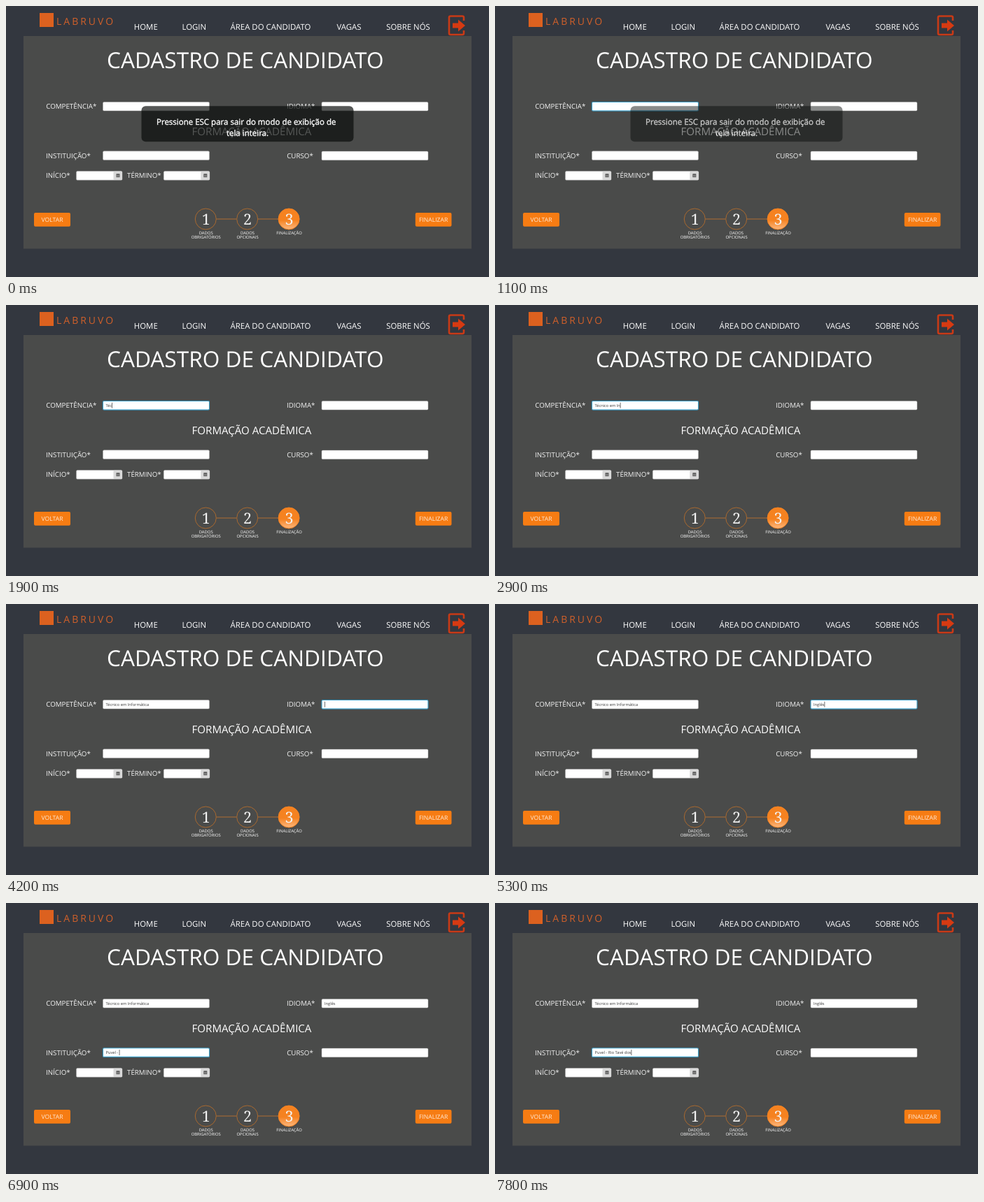
An HTML page that plays this animation: 690 px wide and 388 px high, repeating every 8000 ms.

```html
<!DOCTYPE html>
<html lang="pt">
<head>
<meta charset="utf-8">
<title>Cadastro</title>
<style>
html, body { margin: 0; width: 100%; height: 100%; overflow: hidden; background: #33373f; }
svg { display: block; width: 100vw; height: 100vh; font-family: "Open Sans", "Noto Sans", sans-serif; text-rendering: geometricPrecision; }
</style>
</head>
<body>
<svg id="stage" viewBox="0 0 690 388" preserveAspectRatio="none">
  <defs>
    <linearGradient id="glow" x1="0" y1="0" x2="0" y2="1">
      <stop offset=".55" stop-color="#f58220"/>
      <stop offset="1" stop-color="#fdb880"/>
    </linearGradient>
  </defs>
</svg>
<script>
const LOOP = 8000;
const stage = document.getElementById('stage');

function add(tag, attrs, parent = stage) {
  const el = document.createElementNS('http://www.w3.org/2000/svg', tag);
  for (const key in attrs) el.setAttribute(key, attrs[key]);
  return parent.appendChild(el);
}

function label(text, x, y, size, attrs = {}, parent = stage) {
  const el = add('text', { x, y, 'font-size': size, fill: '#fff', ...attrs }, parent);
  el.textContent = text;
  return el;
}

const centred = (text, x, y, size, attrs, parent) =>
  label(text, x, y, size, { 'text-anchor': 'middle', ...attrs }, parent);

const box = (x, y, width, height, rx, fill, attrs, parent) =>
  add('rect', { x, y, width, height, rx, fill, ...attrs }, parent);

// Header
box(48, 10, 20, 20, 0, '#dc611f');
label('LABRUVO', 72, 26.5, 14, { fill: '#d0602a', 'letter-spacing': 3 });
[['HOME', 199.8], ['LOGIN', 268.8], ['ÁREA DO CANDIDATO', 378], ['VAGAS', 490], ['SOBRE NÓS', 574.5]]
  .forEach(([text, x]) => centred(text, x, 34, 11.4));
add('path', { d: 'M654 21V16.5Q654 14.5 652 14.5H635Q633 14.5 633 16.5V39Q633 41 635 41H652Q654 41 654 39V35',
  fill: 'none', stroke: '#c93a16', 'stroke-width': 2.6 });
add('path', { d: 'M638 24.5H646V19.5L656 28L646 36.5V31.5H638Z', fill: '#d63a12' });

// Panel
box(25, 43, 640, 304.5, 0, '#4a4b4a');
centred('CADASTRO DE CANDIDATO', 341.8, 89, 31.6);
centred('FORMAÇÃO ACADÊMICA', 351, 185.3, 15.1);
[['COMPETÊNCIA*', 57.2, 147], ['IDIOMA*', 401, 147], ['INSTITUIÇÃO*', 57, 217.8],
 ['CURSO*', 401.2, 217.8], ['INÍCIO*', 57, 246.4], ['TÉRMINO*', 173, 246.4]]
  .forEach(([text, x, y]) => label(text, x, y, 9.75, { fill: '#f4f4f4' }));

function field(x, y, width = 152) {
  const frame = box(x, y, width, 12.6, 1.5, '#fff', { stroke: '#a8a8a8', 'stroke-width': .5 });
  const text = label('', x + 4, y + 8.3, 5.7, { fill: '#3a3a3a' });
  const caret = box(x + 4, y + 2.2, .7, 8, 0, '#333', { visibility: 'hidden' });
  return { x, frame, text, caret };
}

function dateField(x) {
  field(x, 236.6, 65.5);
  box(x + 53, 236.8, 12.5, 12.2, 1.5, '#d9d9d9');
  box(x + 57, 240.3, 5, 5, .5, '#555');
  add('path', { d: `M${x + 57.6} 242.4h3.8M${x + 57.6} 244h3.8`, stroke: '#ccc', 'stroke-width': .5 });
}

const skill = field(138.5, 137.5);
const language = field(451, 137.5);
const school = field(138.5, 207.8);
field(451, 208.1);
dateField(100.5);
dateField(225.3);

// Buttons and steps
function button(text, x, width) {
  box(x, 296, width, 19.8, 2, '#f67c13');
  centred(text, x + width / 2, 309, 8.6, { fill: '#ffe9d6' });
}
button('VOLTAR', 40, 52);
button('FINALIZAR', 584.8, 51.7);

add('path', { d: 'M300.5 305H329M360 305H389', stroke: '#b06c32', 'stroke-width': 1 });
[['DADOS', 'OBRIGATÓRIOS'], ['DADOS', 'OPCIONAIS'], ['FINALIZAÇÃO']].forEach((lines, i) => {
  const x = 285.3 + i * 59.4;
  const active = i === 2;
  add('circle', { cx: x, cy: 305, r: 15, fill: active ? 'url(#glow)' : 'none',
    stroke: active ? '#f58220' : '#a9692f', 'stroke-width': 1 });
  centred(i + 1, x + .4, 313.4, 21.5, { 'font-family': '"Noto Serif", serif', fill: '#f2f2f2' });
  lines.forEach((line, n) => centred(line, x + .4, 326.6 + n * 5.9, 5.9));
});

// Full-screen notice
const notice = add('g', {});
box(193.5, 143.3, 303, 51, 6, '#0a0c0b', { 'fill-opacity': .69 }, notice);
[['Pressione ESC para sair do modo de exibição de', 343.2, 170.2], ['tela inteira.', 345, 186.2]]
  .forEach(([text, x, y]) => centred(text, x, y, 11.5, { stroke: '#fff', 'stroke-width': .35 }, notice));

// Each key is [time, characters typed]
const entries = [
  { ...skill, value: 'Técnico em Informática', from: 1050, caretFrom: 1150, to: 3950,
    keys: [[1600, 0], [2000, 4], [2100, 4], [2900, 13], [3000, 14], [3700, 22]] },
  { ...language, value: 'Inglês', from: 3950, caretFrom: 4050, to: 5450,
    keys: [[4500, 0], [4900, 4], [5000, 4], [5200, 6]] },
  { ...school, value: 'Puvel - Rio Tavé dos', from: 5450, caretFrom: 5550, to: LOOP,
    keys: [[5800, 0], [6000, 2], [6100, 2], [6200, 3], [6300, 3], [6500, 5], [6600, 5],
      [6700, 7], [6800, 7], [6900, 8], [7100, 8], [7800, 20]] }
];

function typed(keys, t) {
  let [t0, n0] = keys[0];
  for (const [t1, n1] of keys) {
    if (t < t1) return t < t0 ? n0 : Math.floor(n0 + (n1 - n0) * (t - t0) / (t1 - t0) + 1e-6);
    [t0, n0] = [t1, n1];
  }
  return n0;
}

function render(t) {
  notice.setAttribute('opacity', Math.min(1, Math.max(0, (1238 - t) / 198)));
  for (const e of entries) {
    const focused = t >= e.from && t < e.to;
    const text = e.value.slice(0, typed(e.keys, t)).replace(/ $/, '\u00a0');
    if (e.text.textContent !== text) e.text.textContent = text;
    e.frame.setAttribute('stroke', focused ? '#3a9cc4' : '#a8a8a8');
    e.frame.setAttribute('stroke-width', focused ? 1.1 : .5);
    e.caret.setAttribute('visibility', focused && t >= e.caretFrom ? 'visible' : 'hidden');
    e.caret.setAttribute('x', e.x + 4 + (text ? e.text.getComputedTextLength() : 0));
  }
}

const start = performance.now();
function tick() {
  render((performance.now() - start) % LOOP);
  requestAnimationFrame(tick);
}
tick();
</script>
</body>
</html>
```
